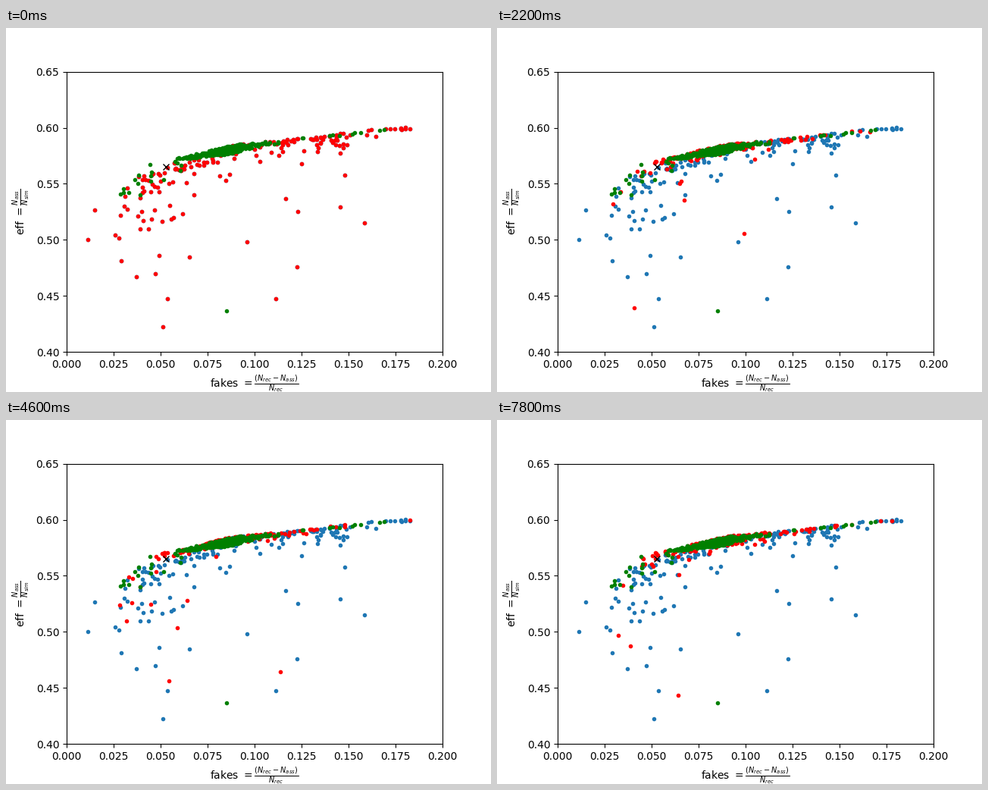
Recreate the animation shown at these times as a matplotlib script. Size 640 px wide and 480 px high, loop 8000 ms.

```python
import matplotlib.pyplot as plt
import numpy as np
from matplotlib.animation import FuncAnimation

FRAMES, INTERVAL = 40, 200

# All points are (fakes, eff) in thousandths.
FRONT_X = [10, 28, 40, 48, 64, 80, 92, 115, 140, 172, 200]
FRONT_Y = [505, 543, 565, 569.5, 574.5, 581.5, 585.5, 589, 594, 600, 602]

# The loneliest members of the starting swarm.
LONERS = [(11.3, 500), (15, 526.5), (29, 481), (47, 470), (53.7, 447.5),
          (51.3, 422.5), (65.3, 485), (96, 498), (111.2, 447.5),
          (122.7, 475.7), (116.5, 536.7), (123, 525), (145.6, 529),
          (158.5, 515), (148, 558)]


def below(x, drop):
    """Points lying a given drop under the efficiency front."""
    return np.column_stack([x, np.interp(x, FRONT_X, FRONT_Y) - drop])


def start_swarm():
    rng = np.random.default_rng(4)
    left = below(rng.normal(47, 10, 50).clip(22, 75), rng.gamma(2, 14, 50))
    inner = below(rng.uniform(57, 90, 45), 2 + rng.exponential(6, 45))
    outer = below(rng.uniform(88, 150, 70), rng.exponential(6, 70))
    tail = below(rng.uniform(150, 188, 14), rng.exponential(1.5, 14))
    return np.vstack([LONERS, left, inner, outer, tail])


def best_swarm():
    rng = np.random.default_rng(8)
    x = np.concatenate([rng.uniform(59, 113, 75), rng.normal(85, 8, 150)])
    x = x.clip(59, 113)
    depth = 2.5 + 5 * np.exp(-((x - 86) / 13) ** 2)
    band = below(x, depth * rng.random(x.size))
    left = below(rng.uniform(28, 62, 18), rng.exponential(8, 18))
    right = below(rng.uniform(115, 172, 10), rng.uniform(0, 2, 10))
    return np.vstack([band, left, right, [(85, 436.7)]])


def swarm(i):
    """Start scattered, then a fresh draw close to the front at each step."""
    if i == 0:
        return START
    rng = np.random.default_rng(100 + i)
    n = 10 + int(24 * np.exp(-i / 2))
    core = below(rng.normal(84, 15, 110).clip(52, 122),
                 rng.exponential(2.6, 110) - 0.3)
    left = below(rng.uniform(45, 62, 8), rng.exponential(3, 8))
    right = below(rng.uniform(110, 150, 14), rng.exponential(1.2, 14))
    tail = below(rng.uniform(145, 185, 3), rng.exponential(1, 3))
    strays = below(rng.uniform(28, 68, n), 2 + rng.exponential(13, n))
    far = np.column_stack([rng.uniform(25, 125, 2), rng.uniform(410, 535, 2)])
    return np.vstack([core, left, right, tail, strays, far])


START = start_swarm()

fig, ax = plt.subplots(figsize=(6.4, 4.8), dpi=100)
ax.scatter(*START.T / 1000, marker='.')
particles = ax.scatter(*START.T / 1000, marker='.', color='red')
ax.scatter(*best_swarm().T / 1000, marker='.', color='green')
ax.plot(0.0528, 0.5652, 'kx')
ax.set_xlim(0, 0.2)
ax.set_ylim(0.4, 0.65)
ax.set_xlabel(r'fakes $=\frac{(N_{rec}-N_{ass})}{N_{rec}}$')
ax.set_ylabel(r'eff $=\frac{N_{ass}}{N_{sim}}$')


def update(i):
    particles.set_offsets(swarm(i) / 1000)
    return particles,


anim = FuncAnimation(fig, update, frames=FRAMES, interval=INTERVAL,
                     init_func=lambda: update(0), repeat=True)
plt.show()
```
